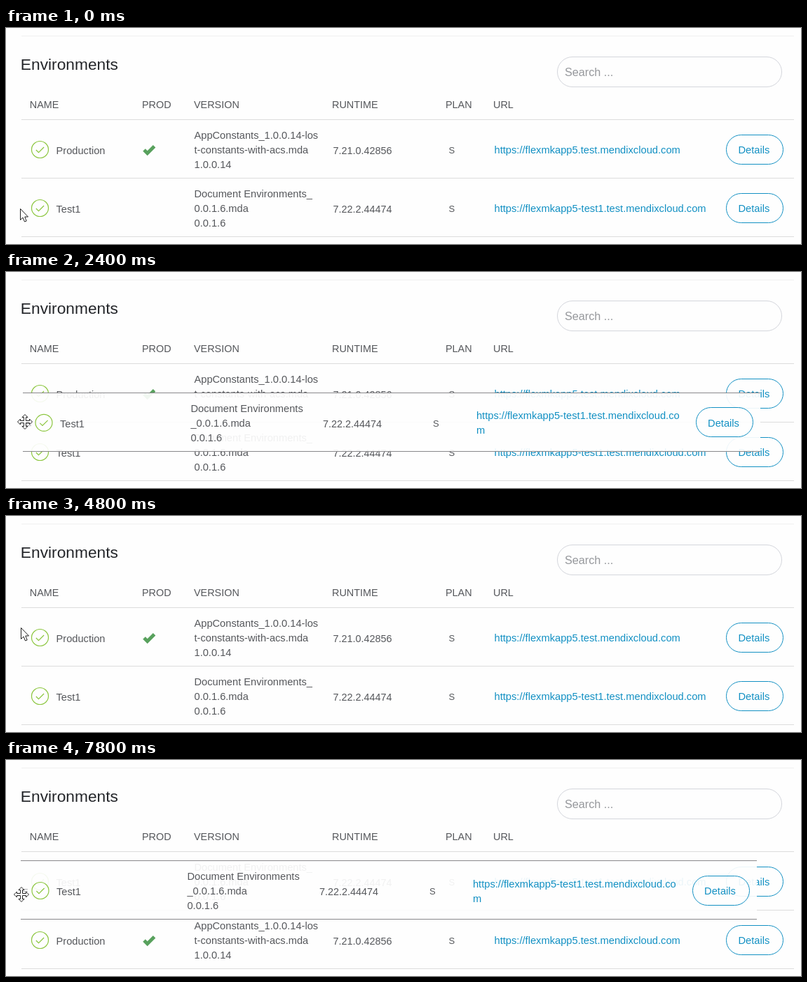
An HTML page with a canvas that plays this animation: 1134 px wide and 310 px high, repeating every 8 s.

```html
<!DOCTYPE html>
<html lang="en">
<head>
<meta charset="utf-8">
<title>Environments</title>
<style>
html, body { margin: 0; width: 100%; height: 100%; overflow: hidden; background: #fefefe; }
canvas { display: block; }
</style>
</head>
<body>
<canvas id="stage" width="1134" height="310"></canvas>
<script>
const ctx = document.getElementById('stage').getContext('2d');
const LOOP = 8000, STEP = 200;
const INK = '#55575b', BLUE = '#1290c3', GREEN = '#8cc63f', PAPER = '#fefefe', RULE = '#dcdcdc';
const LEFT = 22, RIGHT = 1124, HEAD = 131, ROW = 84, ICON = 48.5;
const COLS = { NAME: 33.8, PROD: 194, VERSION: 268, RUNTIME: 465, PLAN: 627, URL: 695 };
const SHRINK = 0.952; // a dragged row is laid out narrower

const PROD = {
  name: 'Production', prod: true, runtime: '7.21.0.42856',
  version: ['AppConstants_1.0.0.14-los', 't-constants-with-acs.mda', '1.0.0.14'],
  url: ['https://flexmkapp5.test.mendixcloud.com']
};
const TEST = {
  name: 'Test1', runtime: '7.22.2.44474',
  version: ['Document Environments_', '0.0.1.6.mda', '0.0.1.6'],
  url: ['https://flexmkapp5-test1.test.mendixcloud.com']
};
const DRAGGED = {
  ...TEST,
  version: ['Document Environments', '_0.0.1.6.mda', '0.0.1.6'],
  url: ['https://flexmkapp5-test1.test.mendixcloud.co', 'm']
};

const within = (t, a, b) => t >= a && t < b;

function ease(t, from, to) {
  const u = Math.min(1, Math.max(0, (t - from) / (to - from)));
  return u * u * (3 - 2 * u);
}

// hover the handle, drag up, rest, then drag back down
function poseAt(t) {
  const x = 20 + 5 * ease(t, 0, 400) + 2 * ease(t, 800, 2000) - 5 * ease(t, 2400, 3200)
    - 1.5 * ease(t, 3400, 4200) + 1.5 * ease(t, 5600, 6200);
  const y = 259 - 7 * ease(t, 400, 800) - 89 * ease(t, 1650, 3340)
    - 3 * ease(t, 3400, 4200) + 3 * ease(t, 5600, 6200) + 30 * ease(t, 6200, 7800);
  const lag = t < 5400 ? 2.5 * ease(t, 2000, 2600) : -5;
  return { x, y, rowY: y + lag };
}

function text(str, x, y, size = 14.65, color = INK) {
  ctx.font = `${size}px "Liberation Sans", Arial, sans-serif`;
  ctx.fillStyle = color;
  ctx.fillText(str, x, y);
}

function hline(y, x0, x1, color) {
  ctx.fillStyle = color;
  ctx.fillRect(x0, y, x1 - x0, 1);
}

function stroke(color, width) {
  ctx.strokeStyle = color;
  ctx.lineWidth = width;
  ctx.stroke();
}

function trace(points) {
  ctx.beginPath();
  points.forEach(([x, y]) => ctx.lineTo(x, y));
}

function pill(x, y, w, h, color) {
  ctx.beginPath();
  ctx.roundRect(x, y, w, h, h / 2);
  stroke(color, 1);
}

function check(x, y, size, color, width) {
  trace([[x - 1.4 * size, y], [x - 0.5 * size, y + 0.9 * size], [x + 1.4 * size, y - size]]);
  stroke(color, width);
}

function statusIcon(x, y) {
  ctx.beginPath();
  ctx.arc(x, y, 12, 0, Math.PI * 2);
  stroke(GREEN, 1.2);
  check(x, y + 0.5, 4, GREEN, 1.2);
}

function cells(row, x, y, scale = 1) {
  const at = (col, pad) => x + (col - ICON + pad) * scale;
  statusIcon(x, y - 0.5);
  text(row.name, x + 23, y + 6);
  if (row.prod) check(at(COLS.PROD, 10.3), y, 5.2, '#58a15d', 5);
  row.version.forEach((s, i) => text(s, at(COLS.VERSION, 0.5), y + 5 + (i - 1) * 21.2));
  text(row.runtime, at(COLS.RUNTIME, 1.5), y + 6, 14.4);
  text('S', at(COLS.PLAN, 4.5), y + 5, 13);
  const first = y + 5 - (row.url.length - 1) * 10.5;
  row.url.forEach((s, i) => text(s, at(COLS.URL, 1.5), first + i * 21, 14.7, BLUE));
  const mid = at(1068, 0);
  pill(Math.round(mid - 41) + 0.5, Math.floor(y - 22) + 0.5, 81, 42, BLUE);
  text('Details', mid - 23.5, y + 5, 14.7, BLUE);
}

function page() {
  ctx.fillStyle = PAPER;
  ctx.fillRect(0, 0, 1134, 310);
  hline(11, LEFT, RIGHT, '#f0f0f0');
  text('Environments', 20.8, 59.5, 22.75, '#24262a');
  pill(786.5, 41.5, 320, 43, '#d4d6dc');
  text('Search ...', 797, 69, 16.2, '#96989c');
  for (const label in COLS) text(label, COLS[label], 115, 14.4);
}

// the drop target gets dark borders that push the rows below it down
function table(rows, target) {
  const shift = target ? 1 : 0, edge = target ? '#1c1c1e' : RULE;
  if (target) {
    ctx.fillStyle = '#f8f8fb';
    ctx.fillRect(LEFT, HEAD, RIGHT - LEFT, ROW);
  }
  hline(HEAD, LEFT, RIGHT, edge);
  rows.forEach((row, i) => {
    const top = HEAD + i * ROW + (i + 1) * shift;
    cells(row, ICON, top + 44);
    hline(top + ROW, LEFT, RIGHT, i ? RULE : edge);
  });
}

function ghost(x, y) {
  const top = Math.floor(y - 43.5), left = x - 30, right = x + 1022;
  ctx.save();
  ctx.beginPath();
  ctx.rect(LEFT - 1, HEAD, 1134, 310);
  ctx.clip();
  ctx.fillStyle = 'rgba(254,254,254,0.92)';
  ctx.fillRect(left, top, right - left, ROW);
  hline(top, left, right, '#88878a');
  hline(top + ROW, left, right, '#88878a');
  for (let i = -1; i < 2; i++) hline(Math.round(y) + i * 3, x - 25, x - 18, '#b5b5b8');
  cells(DRAGGED, x, y, SHRINK);
  ctx.restore();
}

function outline(points) {
  trace(points);
  ctx.closePath();
  ctx.fillStyle = '#fff';
  ctx.fill();
  stroke('#222', 1);
}

function pointer(x, y, moving) {
  ctx.save();
  ctx.translate(x, y);
  if (moving) {
    const arm = [[-1.5, -1.5], [-1.5, -6.5], [-4, -6.5], [0, -10.5], [4, -6.5], [1.5, -6.5]];
    const turn = ([px, py], n) => n ? turn([-py, px], n - 1) : [px, py];
    outline([0, 1, 2, 3].flatMap(n => arm.map(p => turn(p, n))));
  } else {
    outline([[0.5, 0.5], [0.5, 16.5], [4, 13], [6.5, 19], [9.2, 18], [6.8, 12], [11.5, 12]]);
  }
  ctx.restore();
}

function draw(t) {
  const { x, y, rowY } = poseAt(t);
  const dragging = within(t, 800, 3600) || t >= 7000;
  const moving = within(t, 200, 3400) || t >= 6600;
  page();
  table(t < 5400 ? [PROD, TEST] : [TEST, PROD], within(t, 2600, 3600));
  if (dragging) ghost(Math.round(x) + 27, rowY);
  pointer(Math.round(x), Math.round(y), moving);
}

function tick() {
  draw(Math.floor((performance.now() % LOOP) / STEP) * STEP);
  requestAnimationFrame(tick);
}
tick();
</script>
</body>
</html>
```
